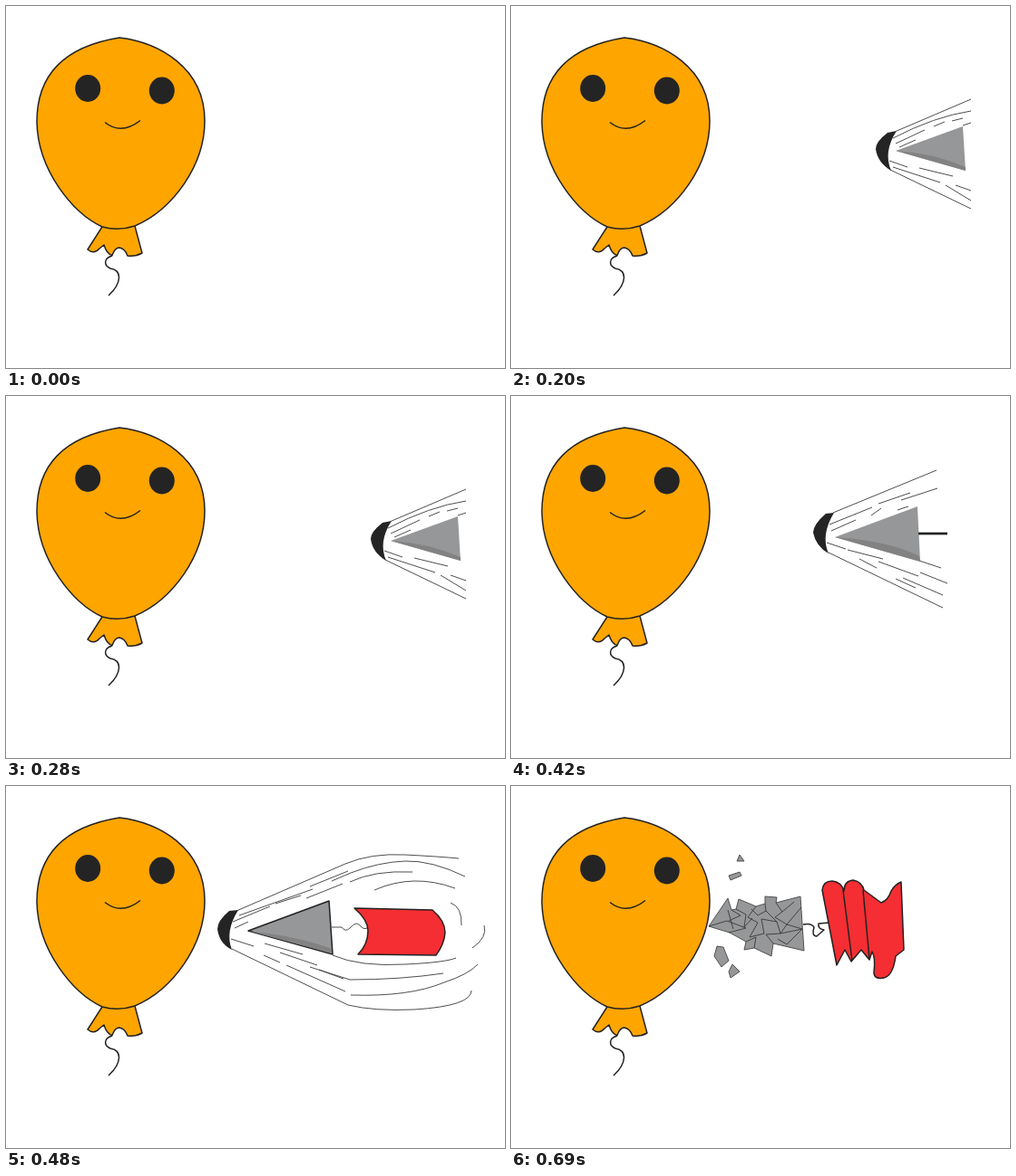
An HTML page that plays this animation: 550 by 400 pixels, repeating every 0.76 s.

```html
<!DOCTYPE html>
<html lang="en">
<head>
<meta charset="utf-8">
<title>Balloon and missile</title>
<style>
  html, body { margin: 0; width: 100%; height: 100%; overflow: hidden; background: #fff; }
  svg { display: block; width: 100%; height: 100%; }
  path { stroke-linejoin: round; }
  .ink { fill: none; stroke: #222; stroke-width: 1.5; }
  .wind { fill: none; stroke: #3a3a3a; stroke-width: 0.9; }
  .dark { fill: #242424; }
  .orange { fill: #ffa500; }
  .gray { fill: #969798; }
  .shade { fill: #828282; }
  .red { fill: #f42e32; }
  .shard { fill: #969798; stroke: #444; stroke-width: 0.9; }
</style>
</head>
<body>
<svg viewBox="0 0 550 400">
  <g id="balloon">
    <path class="ink orange" style="fill:#ffa500" d="M106 244L90 269Q97 275 103 268L108 264Q111 274 117 275.500Q120 267 125 267Q131 268 134 276Q143 277 150 273L142 243Z"/>
    <path class="ink orange" style="fill:#ffa500" d="M125 35C94 40 34 55 34 128C35 182 74 229 106 244Q124 249 142 243C184 225 219 176 219 127C219 67 167 40 125 35Z"/>
    <ellipse class="dark" cx="90.200" cy="91" rx="14" ry="15"/>
    <ellipse class="dark" cx="171.800" cy="93.500" rx="14" ry="15"/>
    <path class="ink" d="M109 128.500Q127 143 148 126.500M117 276C107 279 108 287 115 290C128 292 128 306 113 320"/>
  </g>

  <g class="scene" data-ms="80"></g>

  <g class="scene" data-ms="120">
    <path class="gray" d="M494 158L550 131V181Z"/>
    <path class="shade" d="M494 158Q528 159 550 172V181Z"/>
  </g>

  <g class="scene" data-ms="140">
    <path class="dark" d="M425 138L415 140Q402 150 402 158Q404 173 419 182Q410 161 425 138Z"/>
    <path class="wind" d="M424 138.500L507 103M418 181L507 224M421 146Q467 122 507 116M424 152L456 137M466 133L478 128M428 156L446 148M486 127L498 124M498 132L507 129M417 171L437 178M450 179L487 188M421 178L473 195M479 198L507 215M490 198L507 204"/>
    <path class="gray" d="M424 160L498 133L501 182Z"/>
    <path class="shade" d="M424 160Q464 162 501 178V182Z"/>
  </g>

  <g class="scene" data-ms="140">
    <path class="dark" d="M356 129L347 130Q333 142 333 151Q336 166 350 174Q341 154 356 129Z"/>
    <path class="wind" d="M355 129L469 82M350 173L476 234M351 142L398 123M405 119L440 107M430 115L470 102M353 149L380 137M397 132L408 124M426 126L438 122M348 162L369 169M384 180L403 190M371 170L410 180M405 183L449 199M432 201L476 220M424 202L446 212M450 182L474 190M451 195L481 207"/>
    <path class="gray" d="M357 156L448 122L451 183Z"/>
    <path class="shade" d="M357 156Q417 160 450 177L451 183Z"/>
    <path d="M449 152H481" stroke="#222" stroke-width="2.700"/>
  </g>

  <g class="scene" data-ms="100">
    <path class="dark" d="M256 137L246 138Q233 149 233 158Q235 174 249 181Q241 161 256 137Z"/>
    <path class="wind" d="M254 138L374 86Q402 74 440 76T499 80M249 180L377 242Q406 249 450 247Q513 243 513 226M257 143L338 114M250 150L291 133M252 157L267 150M297 130L325 121M331 124L371 108M359 105L380 96Q411 84 440 83T506 100M379 106Q406 93 448 95M406 115Q449 96 495 113M490 129Q503 134 502 154M527 154Q531 167 514 179M248 169L273 177M284 187L302 195M285 174L327 186M302 184L343 198M309 198L374 227M335 200L379 214Q435 214 482 207M360 187Q390 200 440 197Q484 195 496 190M380 231Q445 233 483 217Q510 208 520 197M345 203L372 213M335 111L377 94"/>
    <path class="ink" style="fill:#969798" d="M267 160L356 127L360 186Z"/>
    <path class="shade" d="M269 160.500Q322 166 359 180V185Z"/>
    <path class="wind" d="M359 156H370Q374 162 379 157Q386 149 390 154T398 157"/>
    <path class="ink red" style="fill:#f42e32" d="M384 135L470 137Q484 149 484 162Q483 175 474 187L388 186Q399 175 399 160Q399 148 384 135Z"/>
  </g>

  <g class="scene" data-ms="180">
    <path class="shard" d="M218 155L239 124L243 137L248 136L251 125L270 133L280 130L280 122L293 123L292 129L319 122L323 182L289 174L287 188L268 179L257 181L259 172L241 162Z"/>
    <path class="wind" d="M218 155L238 149L259 157L240 162M239 137L245 158M248 136L259 142L257 156M270 133L261 145L272 151L263 167L279 163L276 147L293 150L281 138L280 130M292 129L299 139L291 145L304 153L320 134M293 150L297 163L281 164L289 174M304 153L297 163L321 158L304 175L294 169M257 156L266 146M259 172L270 167L268 179M243 137L253 143L240 149M299 139L312 128M265 136L272 143L281 138M304 153L321 158"/>
    <path class="shard" d="M252 76L257 83L249 83ZM240 99L252 95L254 99L242 104ZM227 177L234 178L240 193L232 200L224 188ZM244 197L252 205L242 212L240 205Z"/>
    <path class="ink" d="M322 153Q331 151 334 156Q331 166 337 166L345 159Q338 158 339 152L351 151"/>
    <path class="ink red" style="fill:#f42e32" d="M359 198L343 115Q344 105 354 105Q364 106 367 116Q367 105 377 104Q387 106 389 115L408 129Q416 126 419 116Q423 109 430 106L433 181L424 188Q421 210 411 212Q400 214 400 206Q402 190 398 183L395 192L386 181L375 194L368 181Z"/>
    <path class="ink" d="M366 115L376 193M388 115L395 191"/>
  </g>
</svg>
<script>
  const scenes = [...document.querySelectorAll('.scene')];
  const durations = scenes.map(scene => +scene.dataset.ms);
  const loop = durations.reduce((sum, ms) => sum + ms, 0);
  const start = performance.now();

  function draw(now) {
    let left = Math.max(0, now - start) % loop;
    let current = 0;
    while (left >= durations[current]) left -= durations[current++];
    scenes.forEach((scene, i) => scene.style.display = i === current ? '' : 'none');
    requestAnimationFrame(draw);
  }
  draw(start);
</script>
</body>
</html>
```
